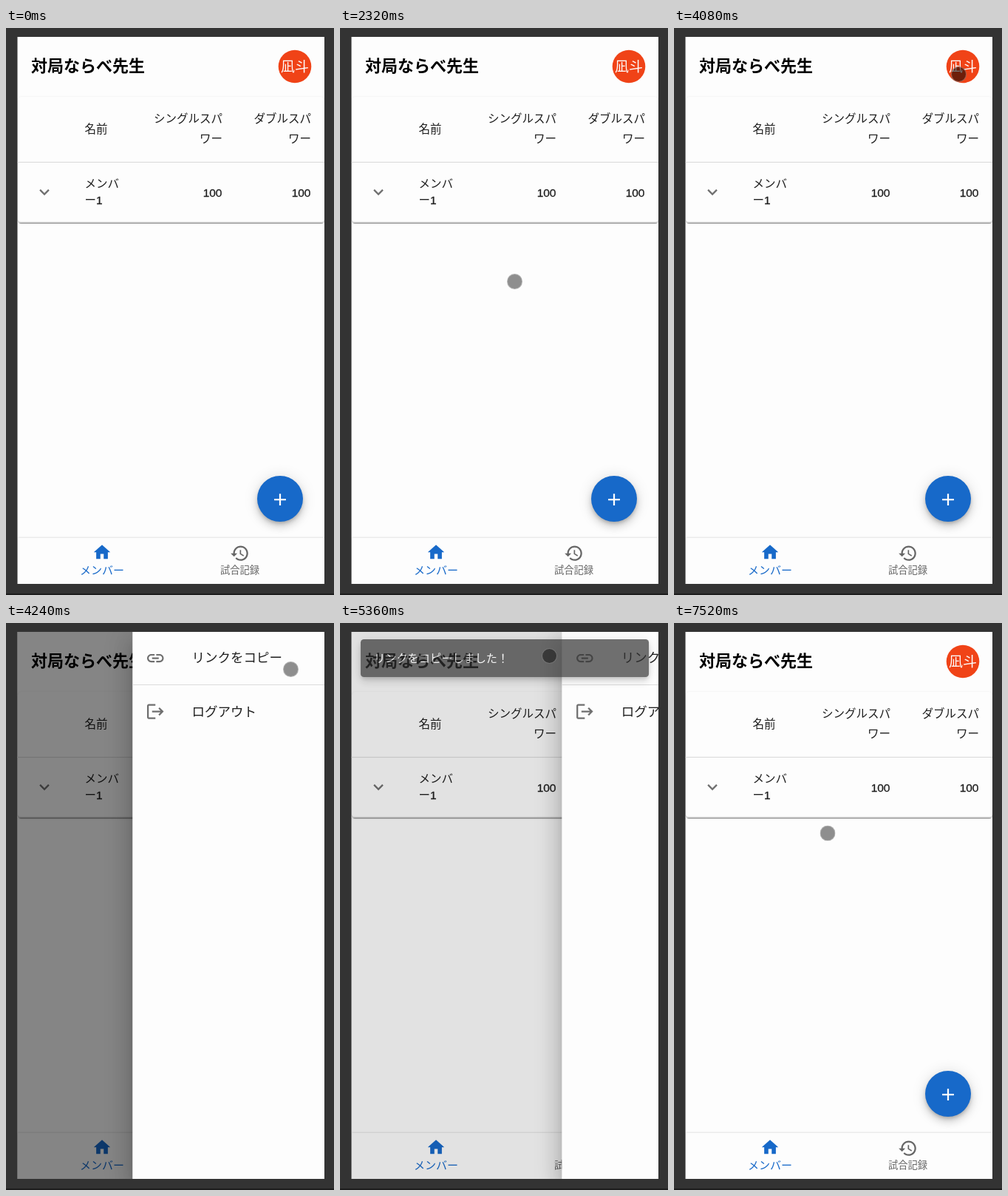
Write an HTML page that moves like this. It is 444 px wide and 766 px high and loops after 8.48 s.

```html
<!DOCTYPE html>
<html lang="ja">
<head>
<meta charset="utf-8">
<title>Member list</title>
<style>
  html, body { margin: 0; width: 100%; height: 100%; overflow: hidden; background: #333; }
  #stage { position: absolute; left: 0; top: 0; width: 444px; height: 766px; overflow: hidden; background: #333; }
  #stage::after { content: ""; position: absolute; left: 0; top: 764px; width: 444px; height: 2px; background: #1d1d1d; }
  #stage div, svg { position: absolute; }
  svg { left: 0; top: 0; width: 444px; height: 766px; overflow: visible; }
  text { font-family: "Noto Sans CJK JP", "Noto Sans CJK", sans-serif; font-size: 15.5px; fill: #1f1f1f; }
  .num { font-family: "Liberation Sans", sans-serif; stroke: #1f1f1f; stroke-width: .3px; }
  .end { text-anchor: end; }
  .mid { text-anchor: middle; }
  #phone { inset: 0; background: #fdfdfd; clip-path: inset(12px 13px 15px 15.5px); }
  #paper { left: 15.5px; top: 92.5px; width: 415.5px; height: 170.5px; border-radius: 4.5px; background: #fdfdfd;
    box-shadow: 0 2.2px 1.1px -1.1px rgba(0,0,0,.3), 0 1.1px 1.1px rgba(0,0,0,.2), 0 1.1px 3.4px rgba(0,0,0,.14); }
  #nav { left: 15.5px; top: 688.5px; width: 415.5px; height: 63px; background: #fdfdfd;
    box-shadow: 0 0 3px rgba(0,0,0,.2); }
  #fab { left: 340px; top: 604.5px; width: 62px; height: 62px; border-radius: 50%; background: #1769c9; }
  #fab, #toast { box-shadow: 0 3.4px 5.6px -1.1px rgba(0,0,0,.2), 0 6.7px 11px rgba(0,0,0,.14), 0 1.1px 20px rgba(0,0,0,.12); }
  #shade { inset: 0; background: rgba(0,0,0,.5); }
  #drawer { left: 158px; top: 12px; width: 273px; height: 739px; background: #fdfdfd;
    box-shadow: 0 9px 11px -6px rgba(0,0,0,.2), 0 18px 27px 2px rgba(0,0,0,.14), 0 7px 34px 6px rgba(0,0,0,.12); }
  #drawer svg { left: -158px; top: -12px; }
  #drawer text { font-size: 17.5px; }
  #toast { left: 24px; top: 21px; width: 398px; height: 53px; border-radius: 4.5px; background: #323232; }
  #toast svg { left: -24px; top: -21px; }
  #toast text { fill: #fff; }
  #touch { left: -10.5px; top: -10.5px; width: 21px; height: 21px; border-radius: 50%; box-sizing: border-box;
    border: 1px solid rgba(255,255,255,.3); }
</style>
</head>
<body>
<div id="stage">
  <div id="phone">
    <div id="paper"></div>
    <div id="nav"></div>
    <div id="fab"></div>
    <svg viewBox="0 0 444 766">
      <text x="34" y="59.2" style="font-size:22px;font-weight:700;fill:#000">対局ならべ先生</text>
      <circle cx="391" cy="52" r="22.3" fill="#f04317"/>
      <text class="mid" x="391" y="59" style="font-size:19px;fill:#fdfdfd">凪斗</text>

      <text x="106.5" y="141.5">名前</text>
      <text class="end" x="293" y="128">シングルスパ</text>
      <text class="end" x="293" y="155">ワー</text>
      <text class="end" x="413" y="128">ダブルスパ</text>
      <text class="end" x="413" y="155">ワー</text>
      <path d="M15.5 181.3h415.5M15.5 262.2h415.5" stroke="#dedede" stroke-width="1.3"/>

      <path transform="translate(38.5 208.2) scale(1.125)" fill="#6f6f6f" d="M7.41 8.59 12 13.17l4.59-4.58L18 10l-6 6-6-6z"/>
      <text x="106.5" y="216">メンバ</text>
      <text x="106.5" y="238">ー<tspan class="num">1</tspan></text>
      <text class="num end" x="292.5" y="227.5">100</text>
      <text class="num end" x="412.5" y="227.5">100</text>

      <path transform="translate(357.5 623.5) scale(1.125)" fill="#fff" d="M19 13h-6v6h-2v-6H5v-2h6V5h2v6h6z"/>
      <path transform="translate(116.5 694.8) scale(1.125)" fill="#1769c9" d="M10 20v-6h4v6h5v-8h3L12 3 2 12h3v8z"/>
      <text class="mid" x="130" y="738" style="font-size:15px;fill:#1769c9">メンバー</text>
      <path transform="translate(303 696.2) scale(1.125)" fill="#666" d="M13 3c-4.97 0-9 4.03-9 9H1l3.89 3.89.07.14L9 12H6c0-3.87 3.13-7 7-7s7 3.13 7 7-3.13 7-7 7c-1.93 0-3.68-.79-4.94-2.06l-1.42 1.42C8.27 19.99 10.51 21 13 21c4.97 0 9-4.03 9-9s-4.03-9-9-9zm-1 5v5l4.28 2.54.72-1.21-3.5-2.08V8H12z"/>
      <text class="mid" x="316.5" y="737" style="font-size:13.3px;fill:#666">試合記録</text>
    </svg>

    <div id="shade"></div>
    <div id="drawer">
      <svg viewBox="0 0 444 766">
        <g fill="#6f6f6f">
          <path transform="translate(175.5 34) scale(1.125)" d="M3.9 12c0-1.71 1.39-3.1 3.1-3.1h4V7H7c-2.76 0-5 2.24-5 5s2.24 5 5 5h4v-1.9H7c-1.71 0-3.1-1.39-3.1-3.1zM8 13h8v-2H8v2zm9-6h-4v1.9h4c1.71 0 3.1 1.39 3.1 3.1s-1.39 3.1-3.1 3.1h-4V17h4c2.76 0 5-2.24 5-5s-2.24-5-5-5z"/>
          <path transform="translate(175.5 106) scale(1.125)" d="m17 7-1.41 1.41L18.17 11H8v2h10.17l-2.58 2.58L17 17l5-5zM4 5h8V3H4c-1.1 0-2 .9-2 2v14c0 1.1.9 2 2 2h8v-2H4V5z"/>
        </g>
        <path d="M158 83.5h273" stroke="#dcdcdc" stroke-width="1.2"/>
        <text x="238.3" y="53">リンクをコピー</text>
        <text x="238.3" y="125.5">ログアウト</text>
      </svg>
    </div>
    <div id="toast">
      <svg viewBox="0 0 444 766"><text x="42.5" y="53">リンクをコピーしました！</text></svg>
    </div>
  </div>
  <div id="touch"></div>
</div>
<script>
const LOOP = 8480, STEP = 80;
const $ = id => document.getElementById(id);
const shade = $('shade'), drawer = $('drawer'), toast = $('toast'), touch = $('touch');

const clamp = v => Math.min(1, Math.max(0, v));
const part = (t, start, length) => clamp((t - start) / length);

// CSS-like cubic bezier, solved by bisection
const bezier = (x1, y1, x2, y2) => x => {
  const at = (a, b, s) => 3 * a * s * (1 - s) ** 2 + 3 * b * s * s * (1 - s) + s ** 3;
  let lo = 0, hi = 1;
  for (let i = 0; i < 24; i++) {
    const s = (lo + hi) / 2;
    if (at(x1, x2, s) < x) lo = s; else hi = s;
  }
  return at(y1, y2, (lo + hi) / 2);
};
const easeOut = bezier(0, 0, .2, 1);
const easeInOut = bezier(.4, 0, .2, 1);
const sharp = bezier(.4, 0, .6, 1);
const sine = x => (1 - Math.cos(Math.PI * x)) / 2;
const linear = x => x;

const OPEN = 4080, CLOSE = 5260, HIDE = 6200, APPEAR = 1680;

// time, x, y, easing towards this point
const path = [
  [APPEAR, 21, 425],
  [1840, 30, 420, linear],
  [2320, 236, 342, sine],
  [2720, 248, 326, sine],
  [3760, 385, 62, sine],
  [4400, 385, 62, linear],
  [5040, 283, 44, sine],
  [5600, 283, 44, linear],
  [6000, 203, 90, sine],
  [6400, 203, 90, linear],
  [7040, 206, 210, x => x ** 1.6],
  [7280, 207.5, 283.5, x => 1 - (1 - x) ** 1.6]
];

function touchAt(t) {
  const i = path.findIndex(p => p[0] > t);
  if (i < 0) return path[path.length - 1].slice(1, 3);
  const a = path[Math.max(0, i - 1)], b = path[i];
  const k = i ? b[3](part(t, a[0], b[0] - a[0])) : 0;
  return [a[1] + (b[1] - a[1]) * k, a[2] + (b[2] - a[2]) * k];
}

function draw(t) {
  const closing = t >= CLOSE;
  const slide = closing ? 1 - sharp(part(t, CLOSE, 195)) : easeOut(part(t, OPEN, 225));
  const dim = closing ? 1 - easeInOut(part(t, CLOSE, 195)) : easeInOut(part(t, OPEN, 225));
  drawer.style.visibility = slide > .001 ? 'visible' : 'hidden';
  drawer.style.transform = `translateX(${273 * (1 - slide)}px)`;
  shade.style.opacity = dim;

  const hiding = t >= HIDE;
  const alpha = hiding ? 1 - easeInOut(part(t, HIDE, 195)) : easeInOut(part(t, CLOSE, 225));
  const grow = hiding ? 1 - easeInOut(part(t, HIDE + 65, 130)) : easeInOut(part(t, CLOSE, 150));
  const size = .75 + .25 * grow;
  toast.style.opacity = alpha;
  toast.style.transform = `scale(${size}, ${size * size})`;

  const [x, y] = touchAt(t);
  const pressed = t === OPEN || t === 5200;
  touch.style.visibility = t >= APPEAR ? 'visible' : 'hidden';
  touch.style.transform = `translate(${x}px, ${y}px)`;
  touch.style.backgroundColor = `rgba(0,0,0,${pressed ? .54 : .44})`;
}

const began = performance.now();
function tick() {
  const t = (performance.now() - began) % LOOP;
  draw(Math.floor(t / STEP) * STEP);
  requestAnimationFrame(tick);
}
tick();
</script>
</body>
</html>
```
